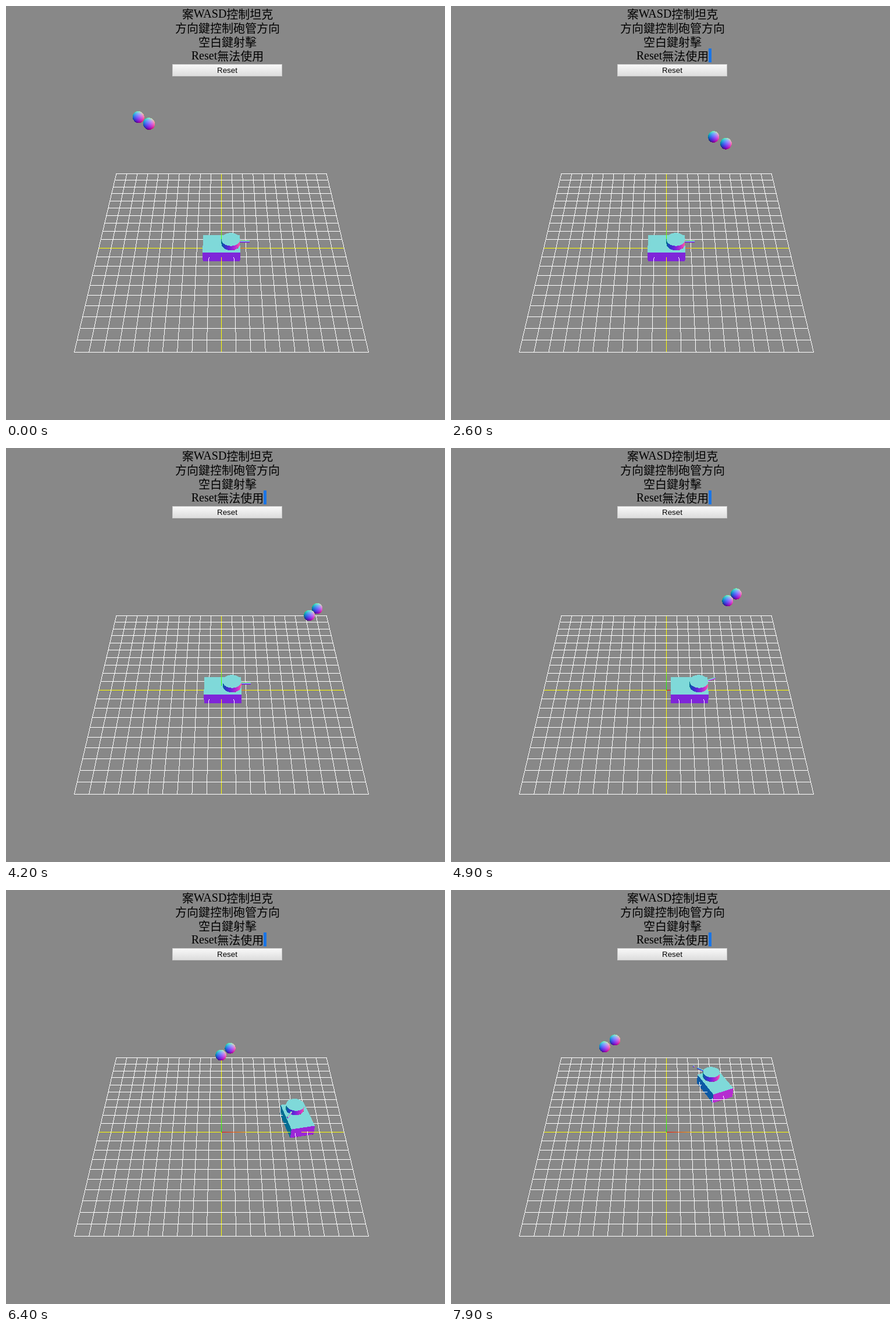
Animation of 755x712 px, one loop 8000 ms. Source, as an HTML page with a canvas:

```html
<!DOCTYPE html>
<html lang="zh-Hant">
<head>
<meta charset="utf-8">
<style>
html, body { margin: 0; width: 100%; height: 100%; overflow: hidden; background: #888; }
#view { position: absolute; left: 0; top: 0; width: 755px; height: 712px; overflow: hidden; }
canvas { display: block; }
#help {
  position: absolute; left: 0; top: 1px; width: 755px; box-sizing: border-box; padding-left: 7px;
  text-align: center; color: #000;
  font: 20px/24px "Liberation Serif", "Noto Sans CJK TC", "Noto Sans CJK", serif;
}
#help span { position: relative; top: 1.5px; font-weight: 300; }
#mark { position: absolute; left: 443px; top: 73px; width: 5px; height: 24px; background: #1a75e6; }
button {
  position: absolute; left: 286px; top: 100px; width: 189px; height: 21px; padding: 0;
  box-sizing: border-box; border: 1px solid #ccc; border-radius: 0;
  background: linear-gradient(#f8f8f8, #ddd); color: #000;
  font: 13.333px/19px "Liberation Sans", Arial, sans-serif;
}
</style>
</head>
<body>
<div id="view">
  <canvas id="stage" width="755" height="712"></canvas>
  <div id="help">
    <div><span>案</span>WASD<span>控制坦克</span></div>
    <div><span>方向鍵控制砲管方向</span></div>
    <div><span>空白鍵射擊</span></div>
    <div>Reset<span>無法使用</span></div>
  </div>
  <div id="mark"></div>
  <button type="button" tabindex="-1">Reset</button>
</div>
<script>
const W = 755, H = 712, LOOP = 8000, STEP = 100;
const FOCAL = 895, DIST = 424.26, C = Math.SQRT1_2, TAU = Math.PI * 2;
const ctx = document.getElementById('stage').getContext('2d');
const mark = document.getElementById('mark');
const img = ctx.createImageData(W, H);
const pix = new Uint32Array(img.data.buffer);
const near = new Float32Array(W * H);
const basePix = new Uint32Array(W * H).fill(0xff888888);
const baseNear = new Float32Array(W * H);

const rgb = (r, g, b) => (255 << 24 | b << 16 | g << 8 | r) >>> 0;
const mix = (a, b, k) => a + (b - a) * k;
const rad = deg => deg * Math.PI / 180;

// camera at 45 degrees, looking at the origin; third value is inverse depth
function project([x, y, z]) {
  const w = 1 / (DIST - (y + z) * C);
  return [370.5 + FOCAL * x * w, 416.5 + FOCAL * C * (z - y) * w, w];
}

// colour of a surface from its normal in view space
function shade([x, y, z]) {
  return [x, (y - z) * C, (y + z) * C].map(v => 127.5 + 127.5 * v);
}

// one pixel per step of the longer axis, sampled at pixel centres
function line(p, q, from, to = from) {
  const a = project(p), b = project(q);
  const m = Math.abs(b[0] - a[0]) > Math.abs(b[1] - a[1]) ? 0 : 1;
  const lo = Math.floor(Math.min(a[m], b[m])), hi = Math.floor(Math.max(a[m], b[m]));
  for (let i = lo; i <= hi; i++) {
    const k = Math.min(1, Math.max(0, (i + 0.5 - a[m]) / (b[m] - a[m])));
    const at = Math.floor(mix(a[1], b[1], k)) * W + Math.floor(mix(a[0], b[0], k));
    basePix[at] = rgb(...from.map((v, j) => mix(v, to[j], k)));
    baseNear[at] = mix(a[2], b[2], k);
  }
}

function drawGround() {
  const white = [255, 255, 255], yellow = [255, 255, 0];
  const cross = (i, col) => {
    line([i, 0, -100], [i, 0, 100], col);
    line([-100, 0, i], [100, 0, i], col);
  };
  cross(0, yellow);
  for (let i = -100; i <= 100; i += 10) if (i) cross(i, white);
  line([0, 0, 0], [20, 0, 0], [255, 0, 0], [255, 170, 0]);
  line([0, 0, 0], [0, 20, 0], [0, 255, 0], [153, 255, 0]);
}

function triangle(a, b, c) {
  const area = (b[0] - a[0]) * (c[1] - a[1]) - (b[1] - a[1]) * (c[0] - a[0]);
  if (Math.abs(area) < 1e-9) return;
  const x0 = Math.max(0, Math.floor(Math.min(a[0], b[0], c[0])));
  const x1 = Math.min(W - 1, Math.ceil(Math.max(a[0], b[0], c[0])));
  const y0 = Math.max(0, Math.floor(Math.min(a[1], b[1], c[1])));
  const y1 = Math.min(H - 1, Math.ceil(Math.max(a[1], b[1], c[1])));
  for (let y = y0; y <= y1; y++) for (let x = x0; x <= x1; x++) {
    const px = x + 0.5, py = y + 0.5;
    const v = ((px - a[0]) * (c[1] - a[1]) - (py - a[1]) * (c[0] - a[0])) / area;
    const u = ((b[0] - a[0]) * (py - a[1]) - (b[1] - a[1]) * (px - a[0])) / area;
    const s = 1 - u - v;
    if (u < 0 || v < 0 || s < 0) continue;
    const w = s * a[2] + v * b[2] + u * c[2], at = y * W + x;
    if (w <= near[at] - 5e-7) continue;
    near[at] = w;
    const ch = i => s * a[i] + v * b[i] + u * c[i];
    pix[at] = rgb(ch(3), ch(4), ch(5));
  }
}

// turn about the vertical axis
function turn([x, y, z], ang) {
  const c = Math.cos(ang), s = Math.sin(ang);
  return [x * c + z * s, y, z * c - x * s];
}

// f(u, v) gives [point, normal] in the local space of a body {pos, ang}
function surface(body, f, nu, nv) {
  const vert = (i, j) => {
    const [p, n] = f(i / nu, j / nv);
    const q = turn(p, body.ang).map((v, k) => v + body.pos[k]);
    return [...project(q), ...shade(turn(n, body.ang))];
  };
  for (let i = 0; i < nu; i++) for (let j = 0; j < nv; j++) {
    const a = vert(i, j), b = vert(i + 1, j), c = vert(i + 1, j + 1), d = vert(i, j + 1);
    triangle(a, b, c);
    triangle(a, c, d);
  }
}

function box(body, size) {
  for (let k = 0; k < 3; k++) for (const sign of [-1, 1]) {
    surface(body, (u, v) => {
      const p = [0, 0, 0], n = [0, 0, 0];
      n[k] = sign;
      p[k] = sign * size[k] / 2;
      p[(k + 1) % 3] = (u - 0.5) * size[(k + 1) % 3];
      p[(k + 2) % 3] = (v - 0.5) * size[(k + 2) % 3];
      return [p, n];
    }, 1, 1);
  }
}

// place maps (along, side, side) to local axes
function cylinder(body, r, from, to, place, seg) {
  const ring = u => [Math.cos(u * TAU), Math.sin(u * TAU)];
  surface(body, (u, v) => {
    const [c, s] = ring(u);
    return [place(mix(from, to, v), r * c, r * s), place(0, c, s)];
  }, seg, 1);
  for (const [h, dir] of [[from, -1], [to, 1]]) {
    surface(body, (u, v) => {
      const [c, s] = ring(u);
      return [place(h, r * v * c, r * v * s), place(dir, 0, 0)];
    }, seg, 1);
  }
}

function ball(pos, r, seg) {
  surface({ pos, ang: 0 }, (u, v) => {
    const a = u * TAU, b = v * Math.PI;
    const n = [Math.sin(b) * Math.cos(a), Math.cos(b), Math.sin(b) * Math.sin(a)];
    return [n.map(k => k * r), n];
  }, seg, seg / 2);
}

const upright = (h, a, b) => [a, h, b];
const lying = (h, a, b) => [h, a, b];

// linear interpolation through [time, value] pairs
function track(t, keys) {
  if (t <= keys[0][0]) return keys[0][1];
  for (let i = 1; i < keys.length; i++) {
    const [t0, a] = keys[i - 1], [t1, b] = keys[i];
    if (t <= t1) return mix(a, b, (t - t0) / (t1 - t0));
  }
  return keys[keys.length - 1][1];
}

function bounceY(t) {
  const g = 45.3, floor = 5, drop = 58.3, loss = 0.843;
  let start = Math.sqrt(2 * drop / g);
  if (t < start) return floor + drop - g / 2 * t * t;
  let v = g * start * loss;
  while (t > start + 2 * v / g) {
    start += 2 * v / g;
    v *= loss;
  }
  const d = t - start;
  return floor + v * d - g / 2 * d * d;
}

function wallX(t, x0) {
  const wall = 99.3, hit = (wall - x0) / 43.5;
  return t < hit ? x0 + 43.5 * t : wall - 36.8 * (t - hit);
}

// straight run, tight left arc, then a straight run away
function tankAt(t) {
  const R = 12.4, bend = 102, turnAt = 5.83, turnEnd = 6.4;
  const deg = track(t, [[turnAt, 0], [turnEnd, bend], [6.5, 115]]);
  const arc = rad(Math.min(deg, bend));
  const run = track(t, [[turnEnd, 0], [7.68, 1]]);
  const x = track(t, [[4.1, 0], [4.2, 1], [4.38, 1], [5.6, 42.2], [turnAt, 50.9]]);
  return {
    pos: [x + R * Math.sin(arc) - 19.7 * run, 0, -R * (1 - Math.cos(arc)) - 43.9 * run],
    ang: rad(deg)
  };
}

function draw(t) {
  pix.set(basePix);
  near.set(baseNear);

  const y = bounceY(t);
  ball([wallX(t, -71.3), y, -96], 5, 24);
  ball([wallX(t, -61.2), y, -85.4], 5, 24);

  const tank = tankAt(t);
  const aim = track(t, [[4.6, 0], [5.6, 85], [6.4, 138], [6.6, 138], [7.7, 28]]);
  const shift = turn([7.5, 0, 0], tank.ang);
  const turret = { pos: tank.pos.map((v, k) => v + shift[k]), ang: tank.ang + rad(aim) };
  box(tank, [30, 10, 20]);
  cylinder(turret, 7.5, 5, 10, upright, 32);
  const gun = { pos: [turret.pos[0], 7.5, turret.pos[2]], ang: turret.ang };
  cylinder(gun, 0.8, 0, 15, lying, 8);

  if (t > 7.85) {
    const shot = turn([15 + (t - 7.8) * 43, 0, 0], gun.ang);
    ball(shot.map((v, k) => v + gun.pos[k]), 1, 8);
  }

  ctx.putImageData(img, 0, 0);
  mark.style.visibility = t >= 2.3 ? 'visible' : 'hidden';
}

drawGround();
let shown = -1;
const begin = performance.now();
function tick() {
  const ms = (performance.now() - begin) % LOOP;
  const step = Math.floor(ms / STEP);
  if (step !== shown) {
    shown = step;
    draw(step * STEP / 1000);
  }
  requestAnimationFrame(tick);
}
tick();
</script>
</body>
</html>
```
